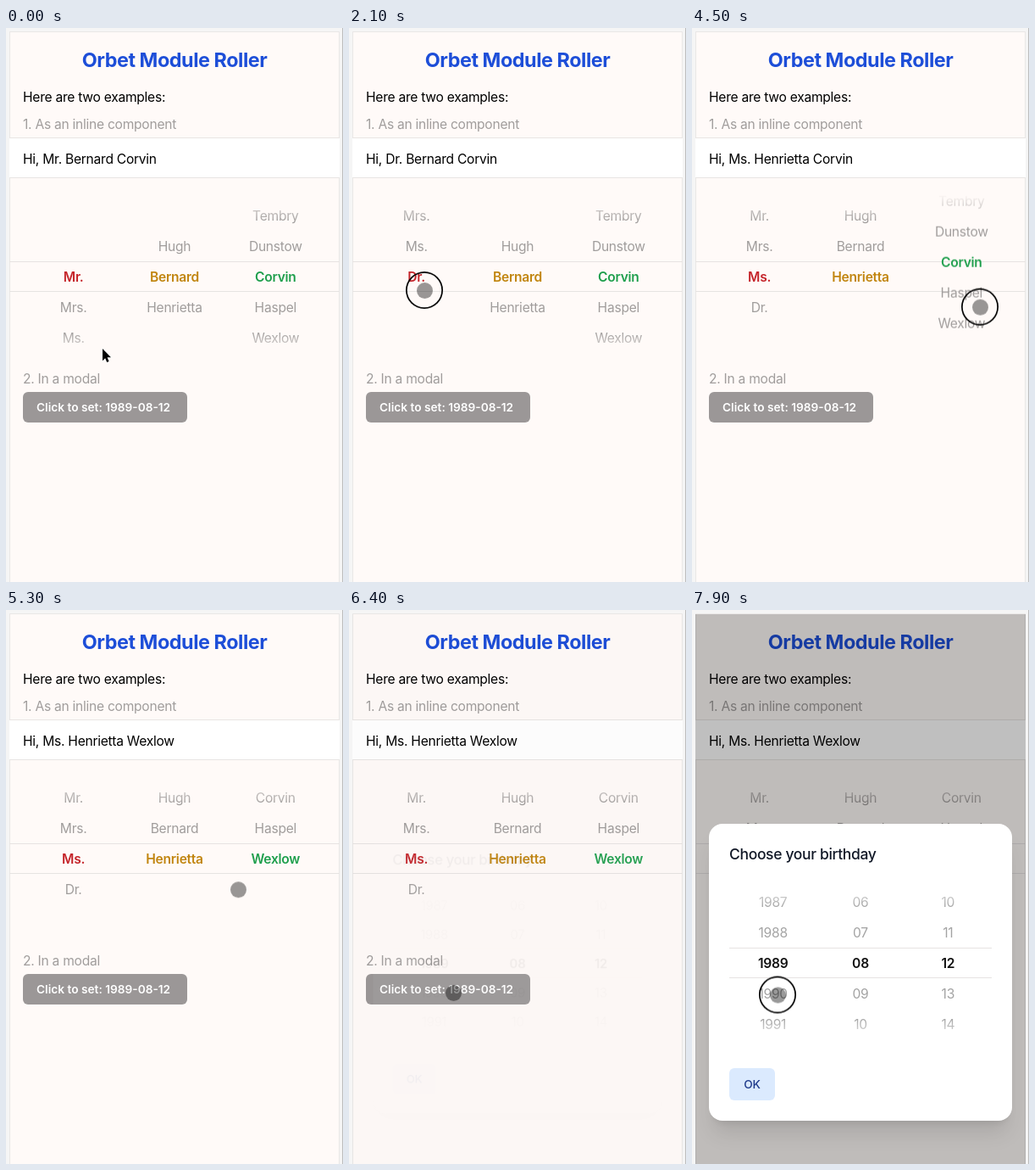
An HTML page for the animation above (8 s loop, 398x653 px).

```html
<!DOCTYPE html>
<html lang="en">
<head>
<meta charset="utf-8">
<title>Wheel demo</title>
<style>
  html, body { margin: 0; width: 100%; height: 100%; overflow: hidden; background: #f5f5f5; }
  body {
    font: 15.6px/37px Inter, "Liberation Sans", sans-serif;
    letter-spacing: -.017em;
    color: #000;
  }
  .stage { position: relative; width: 398px; height: 653px; overflow: hidden; }
  .stage::after {
    content: ""; position: absolute; right: 0; top: 0; width: 1px; height: 100%; background: #bdbdbd;
  }
  .abs, .card, .dim, .panel, .cursor, .arrow { position: absolute; }
  .abs { left: 20px; white-space: nowrap; }
  .grey { color: #a09d9c; }

  .card {
    left: 4px; top: 4px; width: 390px; height: 660px; box-sizing: border-box;
    background: #fffaf8; border: 1px solid #e9e7e6;
  }
  h1 {
    position: absolute; left: 0; top: 20px; width: 398px; margin: 0;
    font-size: 23.4px; line-height: 36px; font-weight: 700; letter-spacing: -.02em;
    text-align: center; color: #1d4ed8;
  }
  .greet {
    position: absolute; left: 4px; top: 129px; width: 390px; height: 46px;
    background: #fff; border: solid #e8e5e3; border-width: 1px 0;
  }
  .greet span { position: absolute; left: 16px; top: 6px; white-space: nowrap; }

  /* wheels */
  .wheel {
    position: absolute; box-sizing: border-box; height: 216px; display: flex; overflow: hidden;
    text-align: center;
    -webkit-mask: linear-gradient(transparent 5%, #000 20%, #000 80%, transparent 95%);
    mask: linear-gradient(transparent 5%, #000 20%, #000 80%, transparent 95%);
  }
  .wheel::before {
    content: ""; position: absolute; left: 0; right: 0; top: 90px; height: 34px;
    border: solid #e6e3e2; border-width: 1px 0;
  }
  .col { flex: 1; padding-top: 90px; transform: translateY(var(--y, 0)); }
  .col div { height: 36px; color: var(--off); }
  .col .sel { color: var(--on); font-weight: 600; }
  .main { left: 4px; top: 185px; width: 390px; padding: 0 16px; --off: #a09d9c; }
  .dates { left: 24px; top: 56px; width: 310px; --off: #a3a3a3; --on: #111; }

  /* button */
  .button {
    position: absolute; left: 20px; top: 429px; width: 193.5px; height: 36px; border-radius: 6px;
    box-sizing: border-box; padding-left: 16px;
    background: #9b9797; color: #fff; white-space: nowrap;
    font-size: 13.7px; line-height: 36px; font-weight: 600; letter-spacing: 0;
  }
  .tap { position: absolute; inset: 0; background: rgba(51, 181, 229, .38); }

  /* modal */
  .dim { left: 4px; top: 5px; width: 390px; height: 648px; background: rgba(0, 0, 0, .25); }
  .panel {
    left: 20px; top: 252px; width: 358px; height: 350px; border-radius: 16px; background: #fff;
    box-shadow: 0 20px 25px -5px rgba(0, 0, 0, .1), 0 8px 10px -6px rgba(0, 0, 0, .1);
  }
  .panel h2 {
    position: absolute; left: 24px; top: 18px; margin: 0; white-space: nowrap;
    font-size: 17.5px; line-height: 36px; font-weight: 500; letter-spacing: -.02em; color: #111827;
  }
  .ok {
    position: absolute; left: 24px; top: 288px; width: 54px; height: 38px; border-radius: 6px;
    background: #dbeafe; color: #1e3a8a; text-align: center;
    font-size: 13.7px; font-weight: 500; line-height: 38px;
  }

  /* pointer */
  .arrow { left: 112px; top: 376px; }
  .cursor { left: 0; top: 0; width: 0; height: 0; }
  .cursor i { position: absolute; border-radius: 50%; }
  .dot { left: -9.5px; top: -9.5px; width: 19px; height: 19px; background: rgba(0, 0, 0, .4); }
  .ring { left: -22px; top: -22px; width: 44px; height: 44px; box-shadow: inset 0 0 0 1.7px #000; }
  .halo { left: -11px; top: -11px; width: 22px; height: 22px; box-shadow: inset 0 0 0 1.7px rgba(255, 255, 255, .6); }

  /* one shared 8 s clock */
  .run { animation: var(--a) 8s linear infinite; }
  .cut { animation: var(--a) 8s step-end infinite; }

  /* selected words */
  @keyframes mr { 0% { color: var(--on); font-weight: 600 } 18.6%, to { color: var(--off); font-weight: 400 } }
  @keyframes dr {
    0%, 33.6%, to { color: var(--off); font-weight: 400 }
    18.6% { color: var(--on); font-weight: 600 }
  }
  @keyframes ms { 0% { color: var(--off); font-weight: 400 } 33.6%, to { color: var(--on); font-weight: 600 } }
  @keyframes first1 { 0% { color: var(--on); font-weight: 600 } 41.1%, to { color: var(--off); font-weight: 400 } }
  @keyframes first2 { 0% { color: var(--off); font-weight: 400 } 41.1%, to { color: var(--on); font-weight: 600 } }
  @keyframes last1 { 0% { color: var(--on); font-weight: 600 } 62.4%, to { color: var(--off); font-weight: 400 } }
  @keyframes last2 { 0% { color: var(--off); font-weight: 400 } 62.4%, to { color: var(--on); font-weight: 600 } }

  /* greetings */
  @keyframes hi1 { 0% { opacity: 1 } 18.6%, to { opacity: 0 } }
  @keyframes hi2 { 0%, 33.6%, to { opacity: 0 } 18.6% { opacity: 1 } }
  @keyframes hi3 { 0%, 41.1%, to { opacity: 0 } 33.6% { opacity: 1 } }
  @keyframes hi4 { 0%, 62.4%, to { opacity: 0 } 41.1% { opacity: 1 } }
  @keyframes hi5 { 0% { opacity: 0 } 62.4%, to { opacity: 1 } }

  /* wheel columns */
  @keyframes colTitle {
    0%, 9.3% { transform: translateY(0) }
    17.5% { transform: translateY(-104px) }
    18.6% { transform: translateY(-104px); animation-timing-function: ease-out }
    22.4%, 28% { transform: translateY(-108px) }
    32.5% { transform: translateY(-88px) }
    33.6% { transform: translateY(-88px); animation-timing-function: ease-out }
    37.4%, to { transform: translateY(-72px) }
  }
  @keyframes colFirst {
    0% { transform: translateY(-36px) }
    41.2% { transform: translateY(-36px); animation-timing-function: ease-out }
    45%, to { transform: translateY(-72px) }
  }
  @keyframes colLast {
    0%, 55.2% { transform: translateY(-72px) }
    56.25% { transform: translateY(-89px) }
    57.5% { transform: translateY(-122px) }
    58.75% { transform: translateY(-142px) }
    62.4% { transform: translateY(-142px); animation-timing-function: ease-out }
    66%, to { transform: translateY(-144px) }
  }

  /* pointer, press and modal */
  @keyframes arrow { 0% { opacity: 1 } 1.2%, to { opacity: 0 } }
  @keyframes touch { 0% { opacity: 0 } 1.2%, to { opacity: 1 } }
  @keyframes press {
    0%, 18.6%, 33.6%, 43.6%, 62.4%, 78.6% { opacity: 0 }
    8.6%, 25.6%, 41.1%, 54.9%, 76.1%, 97.4%, to { opacity: 1 }
  }
  @keyframes tap { 0%, 79.9%, to { opacity: 0 } 78.6% { opacity: 1 } }
  @keyframes path {
    0%, 1.2% { transform: translate(112px, 383px); animation-timing-function: ease-out }
    5%, 8.75% { transform: translate(88px, 373px) }
    17.5% { transform: translate(89px, 261px) }
    18.6% { transform: translate(89px, 261px); animation-timing-function: ease-in-out }
    25%, 26.25% { transform: translate(89px, 309px) }
    32.5% { transform: translate(89px, 337px) }
    33.6% { transform: translate(89px, 337px); animation-timing-function: ease-in-out }
    40% { transform: translate(202px, 337px) }
    43.75% { transform: translate(202px, 337px); animation-timing-function: ease-in-out }
    51.25%, 55% { transform: translate(340px, 354px) }
    56.25% { transform: translate(340px, 329px) }
    57.5% { transform: translate(340px, 296px) }
    58.75% { transform: translate(340px, 276px) }
    62.4% { transform: translate(340px, 276px); animation-timing-function: ease-in-out }
    72.5%, 80% { transform: translate(123px, 451px) }
    83.75% { transform: translate(125px, 433px) }
    86.3% { transform: translate(125px, 433px); animation-timing-function: ease-in-out }
    96.25%, to { transform: translate(101px, 453.5px) }
  }
  @keyframes dim {
    0% { opacity: 0 }
    79.9% { opacity: 0; animation-timing-function: ease-out }
    83.6%, to { opacity: 1 }
  }
  @keyframes panel {
    0% { opacity: 0; transform: scale(.95) }
    79.9% { opacity: 0; transform: scale(.95); animation-timing-function: ease-out }
    83.6%, to { opacity: 1; transform: none }
  }
</style>
</head>
<body>
<div class="stage">
  <div class="card"></div>
  <h1>Orbet Module Roller</h1>
  <div class="abs" style="top:63px">Here are two examples:</div>
  <div class="abs grey" style="top:95px">1. As an inline component</div>
  <div class="greet">
    <span class="cut" style="--a:hi1">Hi, Mr. Bernard Corvin</span>
    <span class="cut" style="--a:hi2">Hi, Dr. Bernard Corvin</span>
    <span class="cut" style="--a:hi3">Hi, Ms. Bernard Corvin</span>
    <span class="cut" style="--a:hi4">Hi, Ms. Henrietta Corvin</span>
    <span class="cut" style="--a:hi5">Hi, Ms. Henrietta Wexlow</span>
  </div>

  <div class="wheel main">
    <div class="col run" style="--a:colTitle; --on:#c5252b">
      <div class="cut" style="--a:mr">Mr.</div>
      <div>Mrs.</div>
      <div class="cut" style="--a:ms">Ms.</div>
      <div class="cut" style="--a:dr">Dr.</div>
    </div>
    <div class="col run" style="--a:colFirst; --on:#c1850f">
      <div>Hugh</div>
      <div class="cut" style="--a:first1">Bernard</div>
      <div class="cut" style="--a:first2">Henrietta</div>
    </div>
    <div class="col run" style="--a:colLast; --on:#1f9f4d">
      <div>Tembry</div>
      <div>Dunstow</div>
      <div class="cut" style="--a:last1">Corvin</div>
      <div>Haspel</div>
      <div class="cut" style="--a:last2">Wexlow</div>
    </div>
  </div>

  <div class="abs grey" style="top:395px">2. In a modal</div>
  <div class="button">Click to set: 1989-08-12<div class="tap cut" style="--a:tap"></div></div>

  <div class="dim run" style="--a:dim"></div>
  <div class="panel run" style="--a:panel">
    <h2>Choose your birthday</h2>
    <div class="wheel dates">
      <div class="col" style="--y:-72px">
        <div>1987</div><div>1988</div><div class="sel">1989</div><div>1990</div><div>1991</div>
      </div>
      <div class="col" style="--y:-72px">
        <div>06</div><div>07</div><div class="sel">08</div><div>09</div><div>10</div>
      </div>
      <div class="col" style="--y:-72px">
        <div>10</div><div>11</div><div class="sel">12</div><div>13</div><div>14</div>
      </div>
    </div>
    <div class="ok">OK</div>
  </div>

  <svg class="arrow cut" style="--a:arrow" width="16" height="22">
    <path d="M2 2v14.2l3.2-3 2 4.8 2.4-1-2-4.7h4.4z" fill="#000" stroke="#fff" stroke-width="1.2" paint-order="stroke"/>
  </svg>
  <div class="cursor run" style="--a:path">
    <i class="dot cut" style="--a:touch"></i>
    <i class="ring cut" style="--a:press"></i>
    <i class="halo cut" style="--a:tap"></i>
  </div>
</div>
</body>
</html>
```
